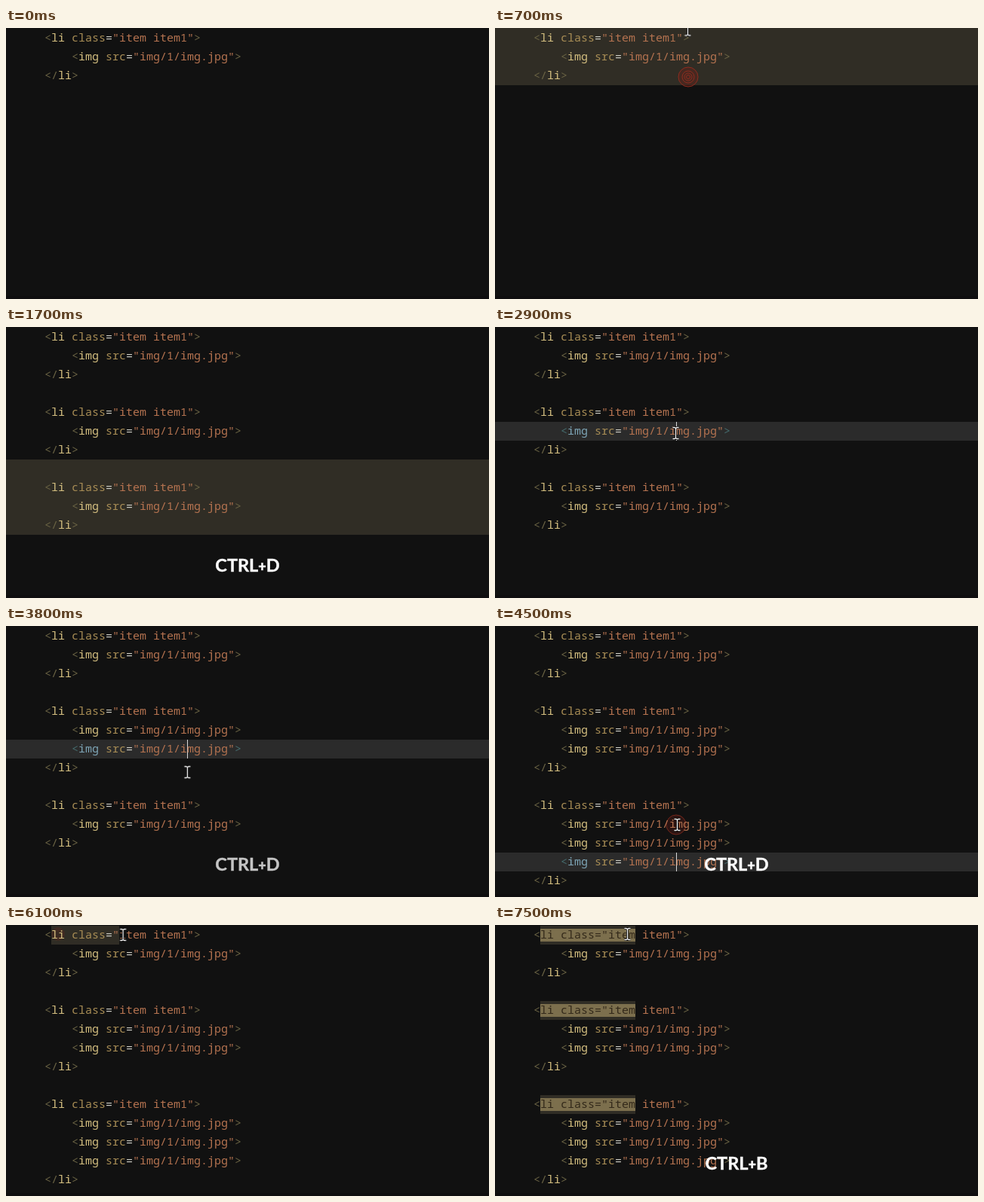
Animation, 640 px wide and 360 px high, one loop 8000 ms. Source, as an HTML page:

```html
<!DOCTYPE html>
<html lang="en">
<head>
<meta charset="utf-8">
<title>Duplicating lines in an editor</title>
<style>
  html, body { margin: 0; width: 100%; height: 100%; overflow: hidden; background: #111; }
  :root {
    --gold: #d4bf80; --olive: #6a6344; --blue: #7ea5b6; --teal: #456c6e; --select: #302d25;
    --tag: var(--gold); --dim: var(--olive);
  }
  #stage {
    position: relative; width: 640px; height: 360px; overflow: hidden; background: #111;
    font: 15px/23px "Noto Sans Mono", monospace;
  }
  #stage > * { position: absolute; }
  #stage *, .step { animation: 8s linear infinite; }
  #stage .step { animation-timing-function: step-end; }
  svg { left: 0; top: 0; }

  /* code */
  #code { left: 0; top: 1px; }
  .row { height: 25px; padding-left: 51px; white-space: pre; overflow: hidden; }
  .dim { color: var(--dim); }
  .tag { color: var(--tag); }
  .attr { color: #a88d55; }
  .eq { color: #d0d0c8; }
  .str { color: #b57350; }
  .block { overflow: hidden; }
  #stage .block2 { animation-name: block2; }
  #stage .block3 { animation-name: block3; }
  #stage .hot1 { animation-name: hot1; }
  #stage .hot2 { animation-name: hot2, grow2; }
  #stage .hot3 { animation-name: hot3; }
  #stage .hot4 { animation-name: hot4, grow4; }
  #stage .hot5 { animation-name: hot5, grow5; }
  @keyframes block2 { 0% { max-height: 0 } 15%, 100% { max-height: 200px } }
  @keyframes block3 { 0% { max-height: 0 } 21%, 100% { max-height: 200px } }
  @keyframes grow2 { 0% { height: 0 } 42.5%, 100% { height: 25px } }
  @keyframes grow4 { 0% { height: 0 } 52.5%, 100% { height: 25px } }
  @keyframes grow5 { 0% { height: 0 } 55%, 100% { height: 25px } }
  @keyframes hot1 { 0%, 42.5%, 100% { --tag: var(--gold); --dim: var(--olive) } 36% { --tag: var(--blue); --dim: var(--teal) } }
  @keyframes hot2 { 0%, 50%, 100% { --tag: var(--gold); --dim: var(--olive) } 42.5% { --tag: var(--blue); --dim: var(--teal) } }
  @keyframes hot3 { 0%, 52.5%, 100% { --tag: var(--gold); --dim: var(--olive) } 50% { --tag: var(--blue); --dim: var(--teal) } }
  @keyframes hot4 { 0%, 55%, 100% { --tag: var(--gold); --dim: var(--olive) } 52.5% { --tag: var(--blue); --dim: var(--teal) } }
  @keyframes hot5 { 0%, 70%, 100% { --tag: var(--gold); --dim: var(--olive) } 55% { --tag: var(--blue); --dim: var(--teal) } }

  /* caret and its line */
  #line { left: 0; width: 640px; height: 25px; background: #2b2b2b; }
  #stage #line { animation-name: line; }
  @keyframes line {
    0% { top: 51px; opacity: 0 }
    5% { top: 51px; opacity: 1 }
    6.4% { top: 51px; opacity: 0 }
    36% { top: 126px; opacity: 1 }
    42.5% { top: 151px; opacity: 1 }
    50% { top: 251px; opacity: 1 }
    52.5% { top: 276px; opacity: 1 }
    55% { top: 301px; opacity: 1 }
    70% { top: 1px; opacity: 1 }
    72.4%, 100% { top: 1px; opacity: 0 }
  }
  #caret { position: absolute; top: 0; width: 1px; height: 25px; background: #d8d8d8; }
  #stage #caret { animation-name: caret; }
  @keyframes caret {
    0% { left: 96px; opacity: 1 }
    36% { left: 240px; opacity: 1 }
    61.25% { left: 240px; opacity: 0 }
    67.5% { left: 240px; opacity: 1 }
    70%, 100% { left: 60px; opacity: 1 }
  }

  /* selections */
  #lines, #word { background: var(--select); }
  #lines { left: 0; width: 640px; height: 100px; }
  #stage #lines { animation-name: lines, dragUp; }
  @keyframes lines {
    0% { top: -24px; opacity: 0 }
    6.4% { top: -24px; opacity: 1 }
    15% { top: 76px; opacity: 1 }
    21% { top: 176px; opacity: 1 }
    36%, 100% { top: 176px; opacity: 0 }
  }
  @keyframes dragUp {
    0% { clip-path: polygon(258px 50px, 100% 50px, 100% 100%, 0 100%, 0 75px, 258px 75px) }
    7.6% { clip-path: polygon(258px 25px, 100% 25px, 100% 100%, 0 100%, 0 50px, 258px 50px) }
    8.6%, 100% { clip-path: polygon(0 0, 100% 0, 100% 100%, 0 100%, 0 0, 0 0) }
  }
  #word { left: 60px; top: 1px; height: 25px; }
  #stage #word { animation-name: word; }
  @keyframes word {
    0% { width: 0 }
    72% { width: 0; animation-timing-function: steps(10) }
    76.1% { width: 90px; animation-timing-function: steps(4) }
    79.4%, 100% { width: 126px }
  }
  .hit {
    left: 60px; width: 126px; height: 25px; white-space: pre; color: #33291a;
    background: linear-gradient(var(--select) 4px, #7c6f4d 4px 21px, var(--select) 21px);
  }
  #stage .hit1 { top: 1px; animation-name: hit1; }
  #stage .hit2 { top: 101px; animation-name: hit2; }
  #stage .hit3 { top: 226px; animation-name: hit3; }
  @keyframes hit1 { 0% { opacity: 0 } 87.5%, 100% { opacity: 1 } }
  @keyframes hit2 { 0% { opacity: 0 } 91.1%, 100% { opacity: 1 } }
  @keyframes hit3 { 0% { opacity: 0 } 93.6%, 100% { opacity: 1 } }

  /* press ripples */
  .ripple { transform-box: fill-box; transform-origin: center; fill: none; stroke: #8f2c1f; }
  .ripple circle:first-child { fill: #7a1f1650; }
  #stage .press1 { animation-name: press1; }
  #stage .press2 { animation-name: press2; }
  #stage .press3 { animation-name: press3; }
  #stage .press4 { animation-name: press4; }
  @keyframes press1 { 0%, 5% { opacity: 0 } 5.8%, 9.4% { opacity: 1 } 11.9%, 100% { opacity: 0 } }
  @keyframes press2 { 0%, 36.5% { opacity: 0 } 37.5%, 41% { opacity: .8 } 44%, 100% { opacity: 0 } }
  @keyframes press3 { 0%, 49.5% { opacity: 0 } 50.5%, 56.5% { opacity: .8 } 58.8%, 100% { opacity: 0 } }
  @keyframes press4 {
    0%, 70% { opacity: 0; transform: scale(1) }
    71%, 73.5% { opacity: 1; transform: scale(1) }
    76.25% { opacity: .5; transform: scale(.62) }
    78.1%, 100% { opacity: 0; transform: scale(.4) }
  }

  /* shortcut captions */
  text { font: 700 23.5px Lato, sans-serif; fill: #fff; stroke: #fff; stroke-width: .4px; text-anchor: middle; }
  tspan { font-size: 18px; font-weight: 900; }
  #stage .dup { animation-name: dup; }
  #stage .next { animation-name: next; }
  @keyframes dup {
    0%, 13.1% { opacity: 0 } 15%, 26.9% { opacity: 1 }
    31.2%, 40.6% { opacity: 0 } 42.5%, 46.9% { opacity: 1 }
    49.4%, 51.2% { opacity: 0 } 52.5%, 58.1% { opacity: 1 }
    62.5%, 100% { opacity: 0 }
  }
  @keyframes next { 0%, 85.6% { opacity: 0 } 87.5%, 100% { opacity: 1 } }

  /* mouse pointer */
  #stage #mouse { animation-name: mouse; }
  #mouse path { fill: none; stroke: #fff; stroke-width: 1.3; }
  #mouse path:first-child { stroke: #000; stroke-width: 3; }
  @keyframes mouse {
    0%, 1.2% { transform: translate(262px, -15px) }
    4.5%, 5.75% { transform: translate(256px, 65px) }
    8.7% { transform: translate(255px, 3px) }
    10.5%, 26% { transform: translate(255px, -15px) }
    31.2%, 34.9% { transform: translate(250px, 15px) }
    36%, 46% { transform: translate(239px, 141px) }
    49.5%, 58% { transform: translate(241px, 264px) }
    67% { transform: translate(98px, 12px) }
    70%, 72% { transform: translate(64px, 12px) }
    76.2% { transform: translate(154px, 13px) }
    79.4% { transform: translate(184px, 13px) }
    82%, 100% { transform: translate(175px, 12px) }
  }
  #foot { left: 0; top: 356px; width: 640px; height: 4px; background: #0f0e0f; }
</style>
</head>
<body>
<div id="stage">
  <div id="foot"></div>
  <div id="lines" class="step"></div>
  <div id="word" class="step"></div>
  <div id="line" class="step"><div id="caret" class="step"></div></div>
  <svg id="ripples" width="640" height="360"></svg>
  <div id="code"></div>
  <div class="hit hit1 step">li class="item</div>
  <div class="hit hit2 step">li class="item</div>
  <div class="hit hit3 step">li class="item</div>
  <svg width="640" height="360">
    <text class="dup" x="320" y="324.5">CTRL<tspan>+</tspan>D</text>
    <text class="next" x="320" y="324.5">CTRL<tspan>+</tspan>B</text>
    <g id="mouse">
      <path d="M-3.5-7.5H-1L.5-6.5 2-7.5H4.5M.5-6.5V6.5M-3.5 7.5H-1L.5 6.5 2 7.5H4.5"/>
      <path d="M-3.5-7.5H-1L.5-6.5 2-7.5H4.5M.5-6.5V6.5M-3.5 7.5H-1L.5 6.5 2 7.5H4.5"/>
    </g>
  </svg>
</div>
<script>
  const span = (cls, text) => `<span class="${cls}">${text}</span>`;
  const row = (html, cls = '') => `<div class="row step ${cls}">${html}</div>`;
  const open = (indent, tag, attr, value) =>
    indent + span('dim', '&lt;') + span('tag', tag) + ' ' + span('attr', attr) +
    span('eq', '=') + span('str', `"${value}"`) + span('dim', '&gt;');

  const li = row(open('', 'li', 'class', 'item item1'));
  const img = cls => row(open('    ', 'img', 'src', 'img/1/img.jpg'), cls);
  const end = row(span('dim', '&lt;/') + span('tag', 'li') + span('dim', '&gt;'));
  const block = (cls, ...rows) => `<div class="block step ${cls}">${rows.join('')}</div>`;

  document.getElementById('code').innerHTML =
    block('', li, img(), end) +
    block('block2', row(''), li, img('hot1'), img('hot2'), end) +
    block('block3', row(''), li, img('hot3'), img('hot4'), img('hot5'), end);

  const ripple = (cls, x, y, radii) =>
    `<g transform="translate(${x} ${y})"><g class="ripple ${cls}">` +
    radii.map(r => `<circle r="${r}"/>`).join('') + '</g></g>';

  document.getElementById('ripples').innerHTML =
    ripple('press1', 256, 65, [13, 8, 5, 2.5]) +
    ripple('press2', 240, 140, [13]) +
    ripple('press3', 240, 264, [13]) +
    ripple('press4', 69, 12, [13, 8]);
</script>
</body>
</html>
```
